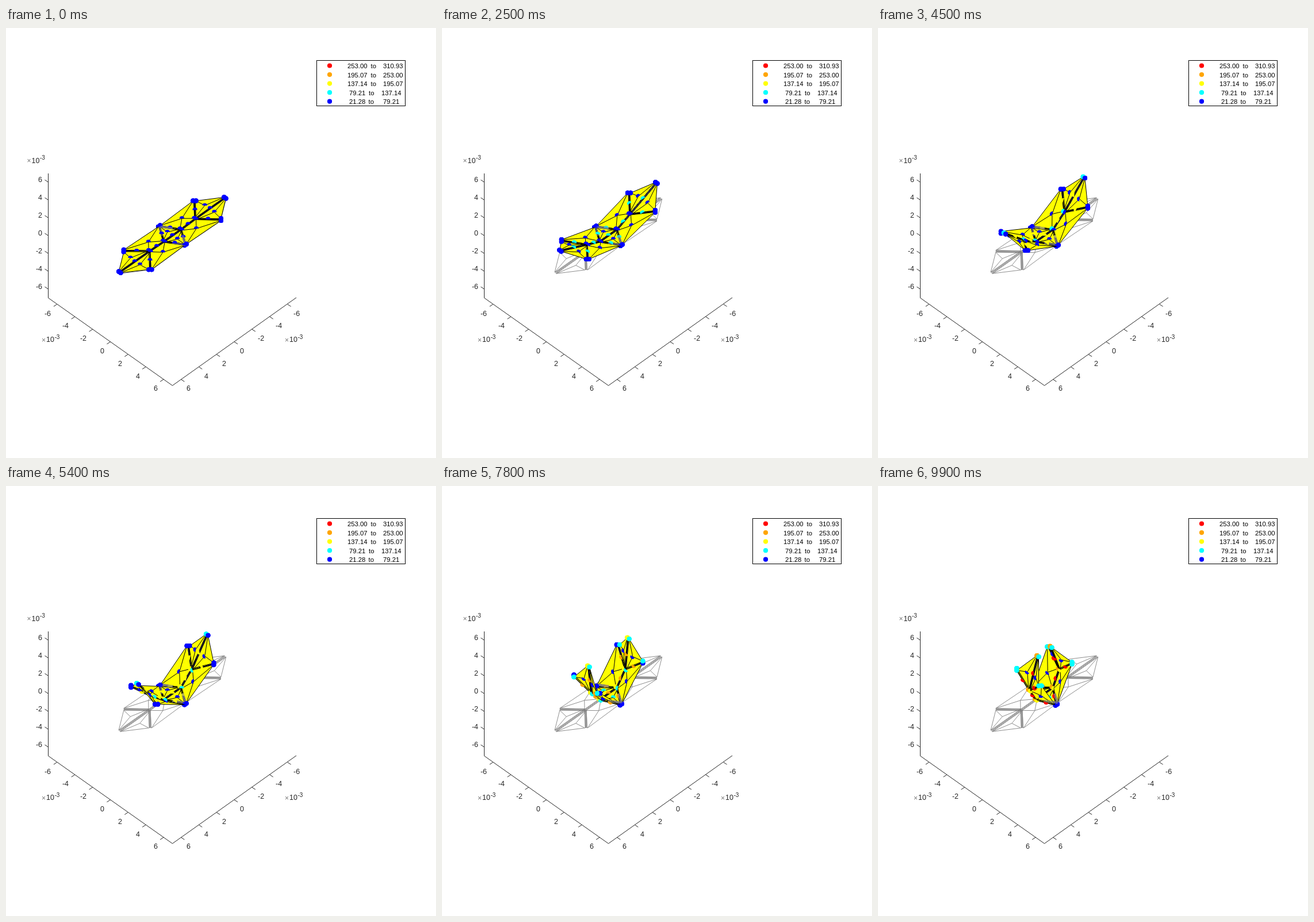
An HTML page with a canvas that plays this animation: 748 px wide and 748 px high, repeating every 10 s.

```html
<!DOCTYPE html>
<html lang="en">
<head>
<meta charset="utf-8">
<title>Folding sheet</title>
<style>
html, body { margin: 0; width: 100%; height: 100%; overflow: hidden; background: #fff; }
canvas { display: block; }
</style>
</head>
<body>
<canvas id="stage" width="748" height="748"></canvas>
<script>
const ctx = document.getElementById('stage').getContext('2d');
const FONT = '"Liberation Sans", Arial, sans-serif';
const INK = '#262626', GREY = '#808080';
const CX = 289.4, CY = 361.2, SX = 15.43, SY = 10.9, SZ = 15.5;
const STEPS = 100, STEP_MS = 100;

// Position of each joint of one quarter at a few steps; the rest follows by symmetry.
const KEYS = [0, 14, 25, 45, 64, 78, 99];
const TRACK = {
  tipY:   [5.93, 5.70, 5.41, 4.47, 3.24, 2.24, 0.74],
  tipZ:   [0.07, 1.26, 2.11, 3.39, 4.28, 4.63, 4.72],
  sideX:  [1.49, 1.48, 1.47, 1.44, 1.42, 1.39, 1.31],
  sideY:  [3.99, 3.91, 3.81, 3.45, 2.95, 2.49, 1.80],
  sideZ:  [0.05, 0.65, 1.08, 1.78, 2.40, 2.76, 3.07],
  jointY: [2.57, 2.53, 2.43, 2.27, 2.07, 1.91, 1.685],
  jointZ: [0.06, 0.43, 0.69, 1.06, 1.30, 1.41, 1.57],
  waistX: [1.48, 1.48, 1.47, 1.47, 1.46, 1.42, 1.36],
  waistZ: [0.02, -0.01, -0.04, -0.10, -0.18, -0.22, -0.29]
};
const FLAT = { tipY: 5.95, tipZ: 0, sideX: 1.49, sideY: 3.99, sideZ: 0,
  jointY: 2.58, jointZ: 0, waistX: 1.48, waistZ: 0 };
const INNER_Y = 0.96;

// Share of the full heating reached by the two nodes of each vertex.
const HEAT = { T: [0.7, 0.36], P: [0.24, 0.28], J: [0.76, 0.42], I: [0.76, 0.42], B: [0.12, 0.15] };
const BANDS = ['#00f', '#0ff', '#ff0', '#ffa500', '#f00'];

function tempColor(n, share) {
  const temp = 289.65 * share * n / 99;
  return BANDS[Math.min(4, Math.floor(temp / 57.93))];
}

function slope(v, i) {
  const a = Math.max(0, i - 1), b = Math.min(KEYS.length - 1, i + 1);
  return (v[b] - v[a]) / (KEYS[b] - KEYS[a]);
}

function sample(v, n) {
  let i = 0;
  while (i < KEYS.length - 2 && n > KEYS[i + 1]) i++;
  const h = KEYS[i + 1] - KEYS[i], u = (n - KEYS[i]) / h;
  const u2 = u * u, u3 = u2 * u;
  return v[i] * (2 * u3 - 3 * u2 + 1) + v[i + 1] * (3 * u2 - 2 * u3)
    + h * (slope(v, i) * (u3 - 2 * u2 + u) + slope(v, i + 1) * (u3 - u2));
}

function poseAt(n) {
  const p = {};
  for (const k in TRACK) p[k] = sample(TRACK[k], n);
  return p;
}

function project(x, y, z) {
  return [CX + SX * (x - y), CY + SY * (x + y) - SZ * z, 21.9 * (0.5 * x + 0.5 * y + 0.707 * z)];
}

// A vertex is a pair of nodes, one on each side of its crease.
function vertex(kind, x, y, z, ox, oy) {
  return {
    kind, at: project(x, y, z),
    pair: [project(x - ox, y - oy, z), project(x + ox, y + oy, z)]
  };
}

const mean = pts => [0, 1, 2].map(k => pts.reduce((s, p) => s + p[k], 0) / pts.length);

// The node of a vertex that belongs to a panel on side m of the spine, end s.
function cornerOf(v, kind, s, m) {
  if (v.kind === 'P') return v.pair[kind === 'end' ? 1 : 0];
  if (v.kind === 'B') return kind === 'core' ? v.at : v.pair[s > 0 ? 0 : 1];
  return v.pair[m > 0 ? 1 : 0];
}

function buildPanels(p) {
  const panels = [];
  const add = (kind, s, m, corners) => {
    const pts = corners.map(c => cornerOf(c, kind, s, m));
    panels.push({ kind, m, corners, pts, mid: mean(pts), up: facing(corners.map(c => c.at)) });
  };
  const inner = s => vertex('I', 0, s * INNER_Y, 0, 0.1, 0);
  const waist = m => vertex('B', m * p.waistX, 0, p.waistZ, 0, -0.1);
  for (const s of [-1, 1]) {
    const tip = vertex('T', 0, s * p.tipY, p.tipZ, 0.1, 0);
    const joint = vertex('J', 0, s * p.jointY, p.jointZ, 0.1, 0);
    for (const m of [-1, 1]) {
      const side = vertex('P', m * p.sideX, s * p.sideY, p.sideZ, -0.08 * m, 0.08 * s);
      add('end', s, m, [joint, tip, side]);
      add('wing', s, m, [inner(s), joint, side, waist(m)]);
    }
  }
  for (const m of [-1, 1]) add('core', 0, m, [inner(-1), inner(1), waist(m)]);
  return panels.sort((a, b) => a.mid[2] - b.mid[2]);
}

// Screen angle of the panel normal on the side turned to the viewer.
function facing([a, b, c]) {
  const u = b.map((v, k) => v - a[k]), w = c.map((v, k) => v - a[k]);
  const nx = u[1] * w[2] - u[2] * w[1];
  const ny = u[2] * w[0] - u[0] * w[2];
  const nz = u[0] * w[1] - u[1] * w[0];
  return nz > 0 ? Math.atan2(ny, nx) : Math.atan2(-ny, -nx);
}

function line(a, b) {
  ctx.beginPath();
  ctx.moveTo(a[0], a[1]);
  ctx.lineTo(b[0], b[1]);
  ctx.stroke();
}

function dot(p, color, angle) {
  ctx.fillStyle = color;
  ctx.beginPath();
  if (angle === undefined) ctx.arc(p[0], p[1], 4.1, 0, 7);
  else ctx.arc(p[0], p[1], 4.1, angle - Math.PI / 2, angle + Math.PI / 2);
  ctx.fill();
}

function crease(a, b, gap) {
  const dx = b[0] - a[0], dy = b[1] - a[1], len = Math.hypot(dx, dy) || 1;
  for (const k of [-gap, 0, gap]) {
    const ox = -dy / len * k, oy = dx / len * k;
    line([a[0] + ox, a[1] + oy], [b[0] + ox, b[1] + oy]);
  }
}

const isHub = v => v.kind === 'I' || v.kind === 'J';

function eachEdge(panel, fn) {
  const { corners, pts } = panel;
  corners.forEach((a, i) => {
    const j = (i + 1) % corners.length, b = corners[j];
    if (isHub(a) || isHub(b)) fn(a.at, b.at, true);
    else fn(pts[i], pts[j], false);
  });
}

function strokePanel(panel, color, width, gap) {
  ctx.strokeStyle = color;
  ctx.lineWidth = width;
  for (const p of panel.pts) line(panel.mid, p);
  eachEdge(panel, (a, b, fold) => fold ? crease(a, b, gap) : line(a, b));
}

function drawPanel(panel, n) {
  const core = panel.kind === 'core';
  const paint = (c, angle) => c.pair.forEach((p, i) => dot(p, tempColor(n, HEAT[c.kind][i]), angle));

  panel.corners.filter(c => !isHub(c)).forEach(c => paint(c));
  ctx.fillStyle = '#ff0';
  ctx.beginPath();
  panel.pts.forEach(p => ctx.lineTo(p[0], p[1]));
  ctx.closePath();
  ctx.fill();
  strokePanel(panel, '#000', 1, 1.25);
  if (panel.kind !== 'end') drawWaistGhost(panel.m);

  eachEdge(panel, (a, b, fold) => {
    if (fold) dot(mean([a, b]), tempColor(n, core ? 0.97 : 0.92), panel.up);
  });
  dot(panel.mid, tempColor(n, core ? 0.27 : 0.13), panel.up);
  panel.corners.forEach(c => paint(c, c.kind === 'T' || c.kind === 'P' ? undefined : panel.up));
}

// The resting outline shows above the sheet where the waist sinks.
function drawWaistGhost(m) {
  const b = project(m * FLAT.waistX, 0, 0);
  ctx.strokeStyle = GREY;
  ctx.lineWidth = 0.9;
  for (const s of [-1, 1]) {
    const i = project(0, s * INNER_Y, 0);
    crease(b, b.map((v, k) => v + (i[k] - v) * 0.62), 1.4);
  }
}

const flatPanels = buildPanels(FLAT);

function text(str, x, y, size, align = 'left', color = INK) {
  ctx.font = size + 'px ' + FONT;
  ctx.textAlign = align;
  ctx.fillStyle = color;
  ctx.fillText(str, x, y);
}

function power(x, y) {
  text('×', x, y + 0.5, 12, 'left', '#777');
  text('10', x + 8, y, 12.5);
  text('-3', x + 22.5, y - 5.5, 10);
}

function drawAxes() {
  ctx.strokeStyle = INK;
  ctx.lineWidth = 1;
  ctx.beginPath();
  ctx.moveTo(73.5, 253);
  ctx.lineTo(73.5, 469.5);
  ctx.lineTo(289.5, 622);
  ctx.lineTo(505, 469);
  ctx.stroke();
  for (let v = -6; v <= 6; v += 2) {
    const k = v + 7, z = CY - SZ * v;
    line([73.5, z], [67.5, z - 4]);
    text(v, 63, z - 0.5, 12.5, 'right');
    const dx = 15.43 * k, y = 469.5 + SY * k;
    line([73.5 + dx, y], [67.5 + dx, y + 4]);
    line([505 - dx, y], [511 - dx, y + 4]);
    const ly = 500.5 + 10.9 * (k - 1);
    text(v, 78 + 15.5 * (k - 1), ly, 12.5, 'right');
    text(v, 500 - 15.5 * (k - 1), ly, 12.5);
  }
  power(36.5, 234.5);
  power(62, 546);
  power(485, 546);
}

function drawLegend() {
  const limits = ['310.93', '253.00', '195.07', '137.14', '79.21', '21.28'];
  ctx.strokeStyle = '#000';
  ctx.lineWidth = 1;
  ctx.strokeRect(540.5, 56.5, 154, 79);
  for (let i = 0; i < 5; i++) {
    const y = 65.5 + 15.55 * i;
    dot([563, y], BANDS[4 - i]);
    const low = i > 2 ? 597 : 594;
    const shift = [0, 0, 0, -3.5, -4][i];
    text(limits[i + 1], low, y + 4.5, 11.3, 'left', '#000');
    text('to', 634.5 + shift, y + 4.5, 11.3, 'left', '#000');
    text(limits[i], i === 3 ? 653 : 656, y + 4.5, 11.3, 'left', '#000');
  }
}

function draw(n) {
  ctx.fillStyle = '#fff';
  ctx.fillRect(0, 0, 748, 748);
  drawAxes();
  flatPanels.forEach(p => strokePanel(p, GREY, 0.9, 1.5));
  buildPanels(poseAt(n)).forEach(p => drawPanel(p, n));
  drawLegend();
}

const start = performance.now();
function tick(now) {
  draw(Math.floor(Math.max(0, now - start) / STEP_MS) % STEPS);
  requestAnimationFrame(tick);
}
draw(0);
requestAnimationFrame(tick);
</script>
</body>
</html>
```
